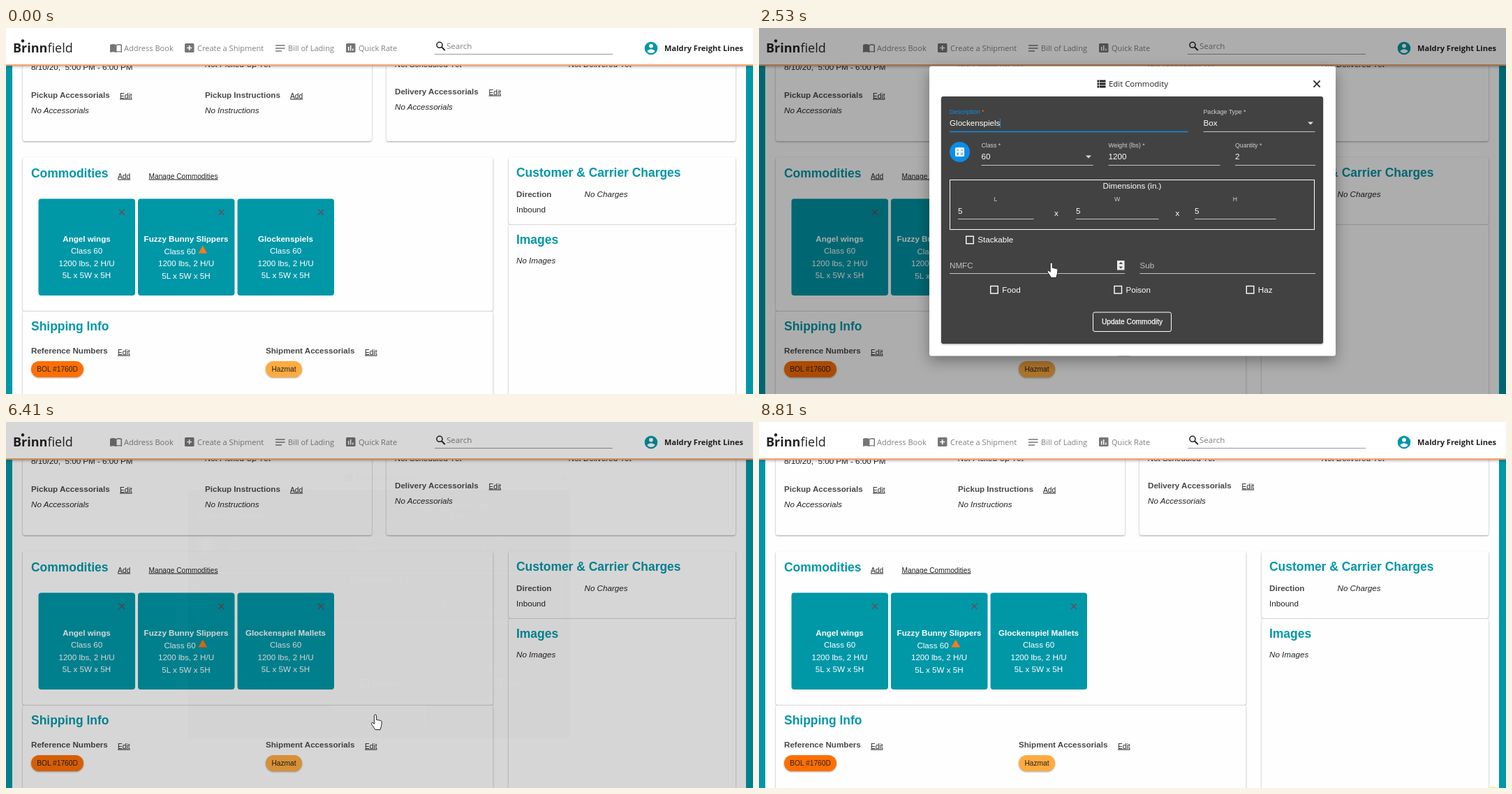
Write an HTML page that moves like this. It is 1070 px wide and 524 px high and loops after 8960 ms.

```html
<!DOCTYPE html>
<html lang="en">
<head>
<meta charset="utf-8">
<title>Edit commodity</title>
<style>
html, body { margin: 0; width: 100%; height: 100%; overflow: hidden; background: #fff; }
svg { display: block; }
text { font-family: "Liberation Sans", Arial, sans-serif; white-space: pre; }
.ui { font-family: "Open Sans", "Noto Sans", sans-serif; }
.b { font-weight: 700; }
.i { font-style: italic; }
.u { text-decoration: underline; }
.card { fill: #fefefe; filter: drop-shadow(0 1px 1px rgba(0,0,0,.36)); }
.chip { filter: drop-shadow(0 1px 1px rgba(0,0,0,.35)); }
.panel { filter: drop-shadow(0 7px 10px rgba(0,0,0,.35)); }
.line { stroke: #c4c4c4; stroke-width: 1; }
.box { fill: none; stroke: #fff; }
</style>
</head>
<body>
<svg id="stage" width="1070" height="524" viewBox="0 0 1070 524"></svg>
<script>
const LOOP = 8960, BODY = 11.64, SMALL = 10.2, TINY = 8.73;
const TEAL = '#0097a7', INK = '#222', LABEL = '#d0d0d0', BLUE = '#0a8ee8';

const text = (x, y, size, str, attrs = '') =>
  `<text x="${x}" y="${y}" font-size="${size}" fill="${INK}" ${attrs}>${str}</text>`;
const rect = (x, y, w, h, attrs = '') =>
  `<rect x="${x}" y="${y}" width="${w}" height="${h}" ${attrs}/>`;
const path = (d, attrs = '') => `<path d="${d}" ${attrs}/>`;
const fill = (color, more = '') => `style="fill:${color}" ${more}`;
const mid = 'text-anchor="middle"';
const cross = (x, y, r, color, w) =>
  path(`M${x - r} ${y - r}l${2 * r} ${2 * r}M${x + r} ${y - r}l${-2 * r} ${2 * r}`, `stroke="${color}" stroke-width="${w}"`);

// ---- page behind the dialog ----
const title = (x, y, s) => text(x, y, 17.45, s, fill(TEAL, 'class="b"'));
const head = (x, y, s) => text(x, y, BODY, s, fill('#484848', 'class="b"'));
const note = (x, y, s) => text(x, y, BODY, s, 'class="i"');
const link = (x, y, s) => text(x, y, SMALL, s, 'class="u"');
const card = (x, y, w, h) => rect(x, y, w, h, 'rx="3" class="card"');
const chip = (x, w, s, color) =>
  rect(x, 477, w, 23, `rx="11.5" fill="${color}" class="chip"`) + text(x + w / 2, 491.5, SMALL, s, mid);

function commodity(x, name, id, hazard) {
  const c = x + 69, dy = hazard ? .6 : 0;
  const row = (y, s, cx = c) => text(cx, y + dy, BODY, s, fill('#fff', mid));
  return rect(x, 244.5, 138.5, 138.5, `rx="4" fill="${TEAL}"`) + cross(x + 119.5, 263.8, 3.8, '#64505c', 1.5) +
    text(c, 305.5, BODY, name, fill('#fff', `${mid} class="b" id="${id}"`)) +
    row(323, 'Class 60', hazard ? c - 9 : c) + row(340.5, '1200 lbs, 2 H/U') + row(358, '5L x 5W x 5H') +
    (hazard ? path('M281.8 311.5l6.3 11h-12.6z', 'fill="#ff7a18"') : '');
}

const nav = (x, s) => text(x, 33, 11.05, s, fill('#808080', 'class="ui"'));
const header =
  rect(0, 0, 1070, 54, 'fill="#fff" style="filter:drop-shadow(0 1px 2px rgba(0,0,0,.35))"') +
  rect(0, 52, 1070, 2.2, 'fill="#f2a572"') +
  text(10, 35, 18, '<tspan class="b">Brinn</tspan>field', 'class="ui"') +
  '<circle cx="24" cy="18.5" r="2.2" fill="#222"/>' +
  path('M149 24q4.500-2 8.500 0q4-2 8.500 0v11q-4.500-1.500-8.500 0q-4-1.500-8.500 0z', 'fill="#757575"') +
  path('M158.500 25q3-1 6 0v8.500q-3-.8-6 0z', 'fill="#fff"') +
  rect(256, 22, 13.500, 13, 'rx="1.500" fill="#757575"') +
  path('M262.700 25v7M259.200 28.500h7', 'stroke="#fff" stroke-width="1.600"') +
  path('M386 25h13.500M386 29h13.500M386 33h9', 'stroke="#757575" stroke-width="1.600"') +
  rect(487, 22, 13.500, 13, 'rx="1.500" fill="#757575"') +
  path('M490.700 27v5.500M493.700 25v7.500M496.800 29.500v3', 'stroke="#fff" stroke-width="1.500"') +
  nav(169, 'Address Book') + nav(274, 'Create a Shipment') + nav(404, 'Bill of Lading') + nav(505, 'Quick Rate') +
  '<circle cx="621" cy="24.300" r="4" fill="none" stroke="#222" stroke-width="1.600"/>' +
  path('M624 27.300l4.800 4.800', 'stroke="#222" stroke-width="2"') +
  text(631, 30, 11.6, 'Search', fill('#808080', 'class="ui"')) +
  path('M614 37.500h255', 'stroke="#999"') +
  `<circle cx="924" cy="29" r="9.300" fill="${TEAL}"/><circle cx="924" cy="25.600" r="2.900" fill="#fff"/>` +
  path('M918.300 32.800q5.700-5 11.400 0q-2.200 3.300-5.700 3.300t-5.700-3.300z', 'fill="#fff"') +
  text(1056, 32.5, 11.1, 'Maldry Freight Lines', 'class="ui b" text-anchor="end"');

const page =
  rect(0, 0, 1070, 524, `fill="${TEAL}"`) + rect(9, 0, 1051, 524, 'fill="#fefefe"') +
  card(24, 20, 500, 142) + card(545, 20, 500, 142) +
  card(24, 185, 673.5, 220) + card(24, 405.5, 673.5, 140) +
  card(720, 185, 325, 96) + card(720, 281.5, 325, 260) +
  text(36, 60, BODY, '8/10/20,  5:00 PM - 6:00 PM') +
  note(285, 55.5, 'Not Picked Up Yet') + note(557, 55.5, 'Not Scheduled Yet') + note(806, 55.5, 'Not Delivered Yet') +
  head(36, 100, 'Pickup Accessorials') + link(163, 100.5, 'Edit') + note(36, 122, 'No Accessorials') +
  head(285, 100, 'Pickup Instructions') + link(407, 100.5, 'Add') + note(285, 122, 'No Instructions') +
  head(557, 94.5, 'Delivery Accessorials') + link(691.5, 95.5, 'Edit') + note(557, 117, 'No Accessorials') +
  title(36, 214, 'Commodities') + link(160, 215.5, 'Add') + link(204.5, 215.5, 'Manage Commodities') +
  commodity(46.5, 'Angel wings', 'c1') + commodity(189, 'Fuzzy Bunny Slippers', 'c2', true) +
  commodity(331.5, 'Glockenspiels', 'c3') +
  title(36, 433, 'Shipping Info') +
  head(36, 466, 'Reference Numbers') + link(160, 467.5, 'Edit') + chip(36, 75, 'BOL #1760D', '#ff6f00') +
  head(372, 466, 'Shipment Accessorials') + link(514, 467.5, 'Edit') + chip(372, 52, 'Hazmat', '#ffab40') +
  title(731, 213, 'Customer &amp; Carrier Charges') + head(731, 241.5, 'Direction') +
  text(731, 264, BODY, 'Inbound') + note(828.5, 241.5, 'No Charges') +
  title(731, 308.5, 'Images') + note(731, 337, 'No Images') + header;

// ---- dialog ----
const white = (x, y, s, attrs = '') => text(x, y, BODY, s, fill('#fff', attrs));
const tiny = (x, y, s, attrs = '') => text(x, y, TINY, s, fill(LABEL, attrs));
const line = (x1, x2, y) => path(`M${x1} ${y}H${x2}`, 'class="line"');
const field = (x, x2, y, label, value) => tiny(x, y - 25, label) + white(x, y - 8, value) + line(x, x2, y + .5);
const caretDown = (x, y) => path(`M${x - 4} ${y - 2}h8l-4 4z`, 'fill="#ddd"');
const check = (x, y, s) => rect(x, y, 10.5, 10.5, 'class="box" stroke-width="1.400"') + white(x + 16.5, y + 9, s);
const side = (x, x2, c, s) => tiny(c, 248, s, mid) + white(x, 265.5, '5') + line(x, x2, 273.5);

const dialog =
  rect(244, 54.7, 582, 414.8, 'id="panel" rx="3" fill="#fff" class="panel"') +
  rect(261, 98, 547, 354, 'id="dark" rx="3" fill="#424242" class="chip"') +
  '<g id="form">' +
  path('M484.500 76h12M484.500 80h12M484.500 84h12', 'stroke="#222" stroke-width="3"') +
  path('M487.500 74v12', 'stroke="#fff" stroke-width=".7"') +
  text(501, 84, 11.4, 'Edit Commodity', 'class="ui"') + cross(799, 80, 4.6, '#222', 1.6) +
  text(273, 123, TINY, 'Description <tspan id="star">*</tspan>', 'id="label"') +
  white(273, 140, '', 'id="desc"') + path('M273 148.500H614.500', 'id="under"') +
  rect(0, 130, 1, 13, `id="caret" fill="${BLUE}"`) +
  field(636.5, 796.5, 148, 'Package Type *', 'Box') + caretDown(790, 136.5) +
  `<circle cx="287.500" cy="177.500" r="14.500" fill="${BLUE}"/>` +
  rect(281, 171, 13, 13, 'rx="1.500" fill="#fff"') +
  path('M283 175h3.500M288.800 175h3.500M283 180h3.500M284.800 178.200v3.600M288.800 179.200h3.500M288.800 181.200h3.500', `stroke="${BLUE}"`) +
  field(318.5, 478.5, 196, 'Class *', '60') + caretDown(472, 184.5) +
  field(500.5, 660.5, 196, 'Weight (lbs) *', '1200') + field(682, 797, 196, 'Quantity *', '2') +
  rect(273.5, 217.5, 522, 71, 'class="box"') + white(534.5, 230, 'Dimensions (in.)', mid) +
  side(285, 393.5, 339, 'L') + side(454, 572.5, 513, 'W') + side(624, 740.5, 682, 'H') +
  white(426, 269, 'x', mid) + white(599.5, 269, 'x', mid) +
  check(296.7, 298.2, 'Stackable') +
  text(273, 343.5, BODY, 'NMFC', fill('#c0c0c0')) + line(273, 524, 351.5) +
  text(545.5, 343.5, BODY, 'Sub', fill('#c0c0c0')) + line(545.5, 797, 351.5) +
  '<g id="spin">' + rect(513, 333, 10.5, 13.5, 'fill="#eee"') +
  path('M515.500 338l2.800-3 2.800 3zM515.500 341.500l2.800 3 2.800-3z', 'fill="#444"') + '</g>' +
  check(331.7, 369.5, 'Food') + check(509, 369.5, 'Poison') + check(698.3, 369.5, 'Haz') +
  rect(478.5, 407, 112, 27.5, 'id="button" rx="2.500" class="box"') +
  text(534.5, 424.3, SMALL, 'Update Commodity', `id="buttonText" ${mid} stroke-width=".25"`) +
  rect(486.5, 420, 5, 4, `id="busy" rx="1" fill="${BLUE}"`) +
  '</g>';

const cursor =
  '<g id="cursor" fill="#fff" stroke="#222" stroke-linejoin="round">' +
  path('M-1.600 12V1.600a1.600 1.600 0 0 1 3.200 0V7.200l6 1.300q1.900.5 1.700 2.500l-.8 5.500-1.500 5H0L-5 14.200q-1.300-2.300.4-2.900 1.300-.2 3 2z', 'id="hand"') +
  path('M0 0V16l3.700-3.500 2.400 5.600 2.300-1-2.400-5.400H11z', 'id="arrow"') + '</g>';

const stage = document.getElementById('stage');
stage.innerHTML = page + rect(0, 0, 1070, 524, 'id="shade"') + `<g id="dialog">${dialog}</g>` +
  rect(1045, 522.6, 13, 1.4, 'id="glow" fill="#f4f08a"') + cursor;

const el = Object.fromEntries([...stage.querySelectorAll('[id]')].map(n => [n.id, n]));
const set = (id, attrs) => { for (const k in attrs) el[id].setAttribute(k, attrs[k]); };
const show = (id, on) => set(id, { visibility: on ? 'inherit' : 'hidden' });

// ---- timing ----
const clamp = v => Math.max(0, Math.min(1, v));
function bezier(x1, y1, x2, y2) {
  const at = (a, b, s) => 3 * (1 - s) ** 2 * s * a + 3 * (1 - s) * s * s * b + s ** 3;
  return p => {
    let lo = 0, hi = 1;
    for (let i = 0; i < 24; i++) {
      const m = (lo + hi) / 2;
      if (at(x1, x2, m) < p) lo = m; else hi = m;
    }
    return at(y1, y2, lo);
  };
}
const fade = bezier(.25, .8, .25, 1), enter = bezier(0, 0, .2, 1), leave = bezier(.4, 0, .2, 1);

// Index of the current step among n equally spaced ones.
const stepAt = (t, a, b, n) => Math.min(n - 1, Math.floor((t - a) / (b - a) * (n - 1) + .1));
const hold = (t, a, b, n) => a + stepAt(t, a, b, n) * (b - a) / (n - 1);

const REST = [418.7, 336], PRESS = [529, 419];
const moves = [
  { a: 290, b: 1140, n: 12, pts: [[890, 464], [640, 395], [409, 321], REST] },
  { a: 5480, b: 6330, n: 12, pts: [REST, [850, 385], PRESS] },
  { a: 7260, b: 8030, n: 11, pts: [PRESS, [670, 440], [933, 530]] }
];
function pointer(t) {
  const m = moves.filter(v => t >= v.a).pop();
  if (!m) return null;
  const p = (stepAt(t, m.a, m.b, m.n) + 1) / m.n;
  const along = p * p * (3 - 2 * p) * (m.pts.length - 1);
  const i = Math.min(m.pts.length - 2, Math.floor(along)), f = along - i;
  return m.pts[i].map((v, k) => v + (m.pts[i + 1][k] - v) * f);
}

const typed = [[2990, ' '], [3450, 'M'], [3760, 'a'], [3930, 'l'], [4080, 'l'], [4230, 'e'], [4400, 't'], [4550, 's']];
const description = t => 'Glockenspiel' + (t < 2610 ? 's' : typed.filter(k => t >= k[0]).map(k => k[1]).join(''));

function draw(t) {
  let shade = 0, alpha = 0, scale = 1;
  if (t >= 6410) {
    const q = hold(t, 6410, 6710, 5) - 6346;
    shade = t >= 6710 ? 0 : 1 - fade(clamp(q / 400));
    alpha = 1 - leave(clamp(q / 75));
  } else if (t >= 1290) {
    const q = hold(t, 1290, 1760, 7) - 1273;
    shade = t >= 1760 ? 1 : fade(clamp(q / 400));
    alpha = enter(clamp(q / 150));
    scale = .7 + .3 * alpha;
  }
  set('shade', { opacity: .32 * shade });
  set('dialog', { opacity: alpha, transform: `translate(535 262) scale(${scale}) translate(-535 -262)` });
  show('dialog', alpha > .001);

  const focus = t >= 1450 && t < 6250, busy = t >= 6330, up = busy ? 1 : 0;
  set('label', { style: `fill:${focus ? BLUE : LABEL}` });
  set('star', { style: `fill:${focus ? '#ff6f00' : LABEL}` });
  set('under', { stroke: focus ? BLUE : '#c4c4c4', 'stroke-width': focus ? 1.6 : 1 });
  el.desc.textContent = description(t);
  const caretOn = focus && !(t >= 1980 && t < 2530) && t < 5100;
  show('caret', caretOn);
  if (caretOn) set('caret', { x: Math.round(273 + el.desc.getComputedTextLength()) });
  show('spin', t >= 1450 && t < 5480);

  set('panel', { y: 54.7 - up, height: 414.8 + up });
  set('dark', { y: 98 - up, height: 354 + up });
  set('form', { transform: `translate(0 ${-up})` });
  set('button', { x: busy ? 468.5 : 478.5, width: busy ? 132 : 112, height: 27.5 + up, stroke: '#fff' });
  const ink = busy ? '#858585' : '#fff';
  set('buttonText', { x: busy ? 544.5 : 534.5, style: `fill:${ink};stroke:${ink}` });
  show('busy', busy);
  el.c3.textContent = t >= 6410 ? 'Glockenspiel Mallets' : 'Glockenspiels';
  show('glow', t >= 8810);

  const pos = pointer(t);
  show('cursor', pos && pos[1] < 524);
  if (!pos) return;
  const [x, y] = pos;
  const hand = t < 5480 ? x < 470 && y < 383 : t < 7260 && x > 478 && x < 591 && y > 405;
  set('cursor', { transform: `translate(${x} ${y})` });
  show('hand', hand);
  show('arrow', !hand);
}

const start = performance.now();
function tick() {
  draw((performance.now() - start) % LOOP);
  requestAnimationFrame(tick);
}
tick();
</script>
</body>
</html>
```
